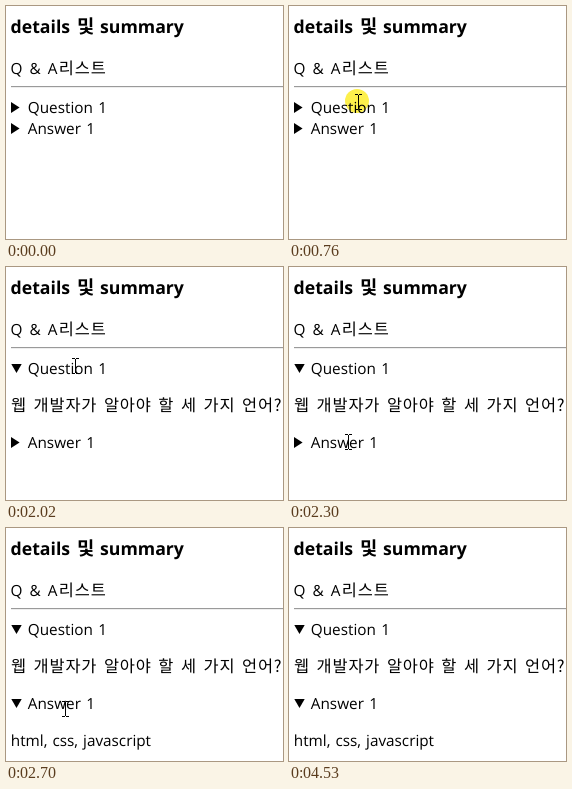
Animation of 277x233 px, one loop 5260 ms. Source, as an HTML page:

```html
<!DOCTYPE html>
<html lang="ko">
<head>
<meta charset="utf-8">
<title>details 및 summary</title>
<style>
html, body { margin: 0; width: 100%; height: 100%; overflow: hidden; background: #fff; }
svg { display: block; width: 277px; height: 233px; }
text { font: 15.3px "Open Sans", "Noto Sans", sans-serif; text-rendering: geometricPrecision; }
.ko { font: 350 16.4px "Noto Sans CJK KR", "Noto Sans CJK", sans-serif; letter-spacing: .85px; word-spacing: 1.2px; }
.h { font-size: 17.7px; font-weight: 700; }
.ko.h { font-size: 18.8px; }

.anim, .anim * { animation: 5260ms step-end infinite; }
.anim .still { animation: none; }
#q-closed { animation-name: q-closed; }
#q-open { animation-name: q-open; }
#a-closed { animation-name: a-closed; }
#a-open, #a-text { animation-name: a-open; }
#answer { animation-name: answer; }
#click { animation-name: click; }
#cursor { animation-name: move; }
#arrow { animation-name: arrow; }
#beam { animation-name: beam; }

@keyframes q-closed { 0% { opacity: 1 } 16.92%, 100% { opacity: 0 } }
@keyframes q-open { 0% { opacity: 0 } 16.92%, 100% { opacity: 1 } }
@keyframes a-closed { 0% { opacity: 1 } 51.33%, 100% { opacity: 0 } }
@keyframes a-open { 0% { opacity: 0 } 51.33%, 100% { opacity: 1 } }
@keyframes answer {
  0% { transform: translateY(0) }
  16.92%, 100% { transform: translateY(53px) }
}
@keyframes click {
  0% { opacity: 0; transform: translate(68px, 95px) }
  14.44% { opacity: 1; transform: translate(68px, 95px) }
  16.92% { opacity: 0; transform: translate(58px, 180px) }
  48.85% { opacity: 1; transform: translate(58px, 180px) }
  51.33%, 100% { opacity: 0; transform: translate(58px, 180px) }
}
@keyframes move {
  0%, 1.33% { transform: translate(219px, 163px) }
  2.66% { transform: translate(195px, 112px) }
  3.99% { transform: translate(165px, 99px) }
  5.32% { transform: translate(128px, 94px) }
  6.65% { transform: translate(92px, 91px) }
  7.98% { transform: translate(72px, 89px) }
  9.31% { transform: translate(66px, 88px) }
  38.4% { transform: translate(66px, 91px) }
  39.73% { transform: translate(64px, 104px) }
  41.06% { transform: translate(61px, 127px) }
  42.39% { transform: translate(58px, 152px) }
  43.72% { transform: translate(56px, 167px) }
  45.05% { transform: translate(56px, 171px) }
  46.38% { transform: translate(56px, 173px) }
  83.46% { transform: translate(56px, 177px) }
  84.79%, 100% { transform: translate(58px, 201px) }
}
@keyframes arrow {
  0% { opacity: 0 }
  1.33% { opacity: 1 }
  6.65% { opacity: 0 }
  84.79% { opacity: 1 }
  86.12%, 100% { opacity: 0 }
}
@keyframes beam {
  0% { opacity: 0 }
  6.65% { opacity: 1 }
  84.79%, 100% { opacity: 0 }
}
</style>
</head>
<body>
<svg viewBox="0 0 277 233">
  <defs>
    <path id="right" d="M5 96L13.6 101.5L5 107Z"/>
    <path id="down" d="M5.3 97H15.7L10.5 106Z"/>
  </defs>

  <g class="anim"><circle id="click" r="12" fill="#fdf04c"/></g>

  <text class="h" x="4.5" y="27">details</text>
  <text class="ko h" x="71" y="27">및</text>
  <text class="h" x="94" y="27">summary</text>

  <text x="4.6" y="68" word-spacing="3.1">Q &amp; A</text>
  <text class="ko" x="52.8" y="68">리스트</text>
  <path d="M5 80.5H277" stroke="#9a9a9a"/>
  <path d="M5 81.5H277" stroke="#eee"/>

  <text x="21.8" y="107" word-spacing="1.5">Question 1</text>
  <g class="anim">
    <use id="q-closed" href="#right"/>
    <g id="q-open">
      <use class="still" href="#down"/>
      <text class="ko still" x="5" y="144">웹 개발자가 알아야 할 세 가지 언어?</text>
    </g>
    <g id="answer">
      <use id="a-closed" href="#right" y="21"/>
      <use id="a-open" href="#down" y="21"/>
      <text class="still" x="21.8" y="128" word-spacing="1.5">Answer 1</text>
    </g>
    <text id="a-text" x="4.8" y="218" word-spacing="1">html, css, javascript</text>
  </g>

  <g class="anim">
    <g id="cursor">
      <path id="arrow" d="M.5 .5V16.5L4.2 13L6.6 18.5L9 17.4L6.7 12H11.2Z" fill="#fff" stroke="#000"/>
      <path id="beam" d="M0 .5H3M4 .5H7M3.5 1V15M0 15.5H3M4 15.5H7" fill="none" stroke="#000"/>
    </g>
  </g>
</svg>
</body>
</html>
```
